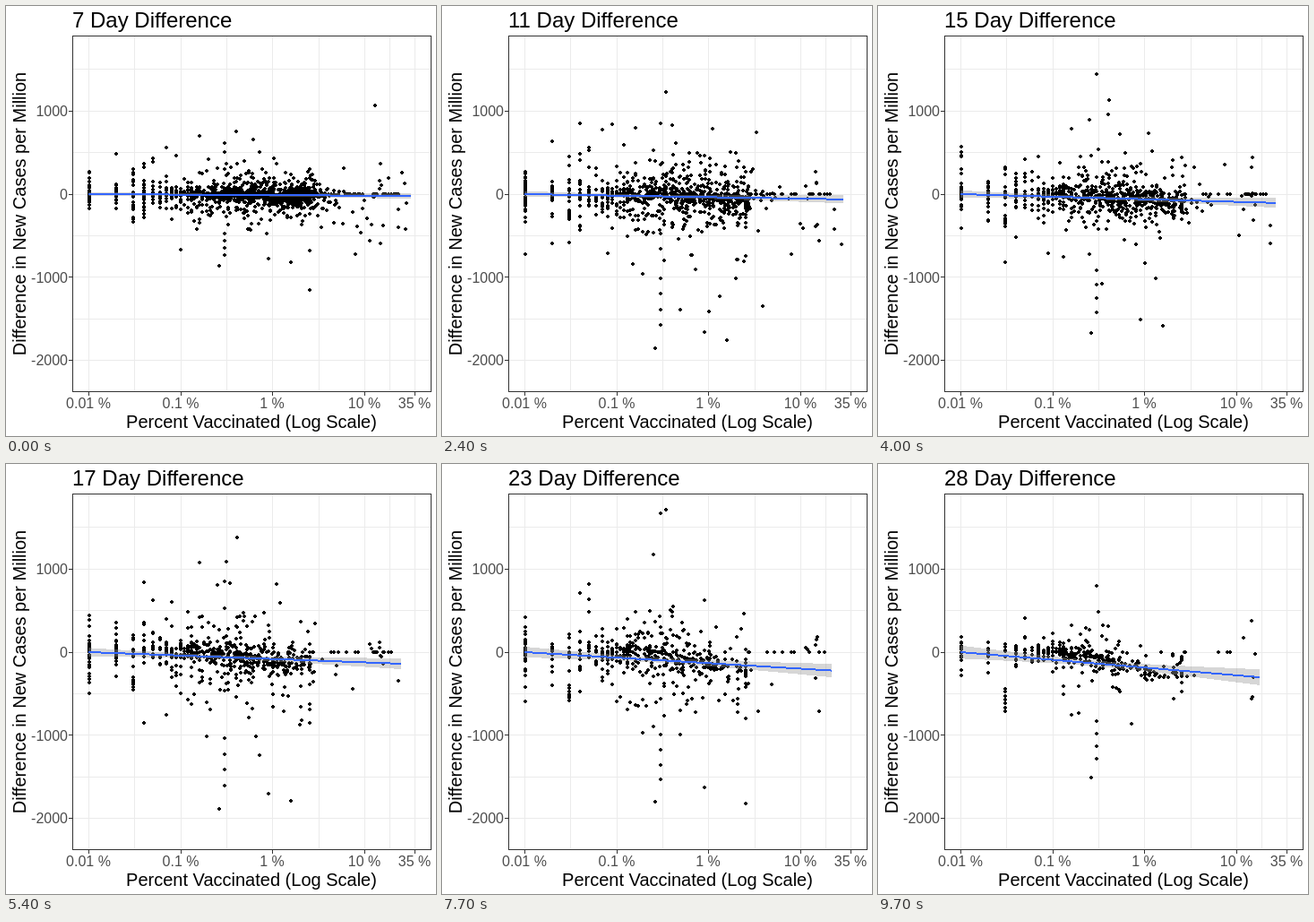
Write an HTML page with a canvas that moves like this. It is 480 px wide and 480 px high and loops after 10 s.

```html
<!DOCTYPE html>
<html lang="en">
<head>
<meta charset="utf-8">
<title>Day Difference</title>
<style>
  html, body { margin: 0; width: 100%; height: 100%; overflow: hidden; background: #fff; }
  canvas, svg { position: absolute; left: 0; top: 0; }
  text { font-family: "Liberation Sans", Arial, sans-serif; font-size: 20px; }
  .tick { font-size: 16px; fill: #4d4d4d; }
</style>
</head>
<body>
<canvas width="480" height="480"></canvas>
<svg width="480" height="480">
  <text id="title" x="74" y="24" style="font-size:24px"></text>
  <text x="274" y="471" text-anchor="middle">Percent Vaccinated (Log Scale)</text>
  <text transform="translate(22 232) rotate(-90)" text-anchor="middle">Difference in New Cases per Million</text>
</svg>
<script>
const ctx = document.querySelector('canvas').getContext('2d');
const svg = document.querySelector('svg');
const title = document.getElementById('title');
const PANEL = { x: 74, y: 33, w: 400, h: 397 };
const ZERO = 210, LEFT = 92.55, DECADE = 102.6;

// Axes: percent on a log scale starting at 0.01, cases on a linear scale
const logToX = lx => LEFT + DECADE * lx;
const percentToX = percent => logToX(Math.log10(percent * 100));
const casesToY = cases => ZERO - 0.0927 * cases;
const percents = [0.01, 0.1, 1, 10, 35];
const cases = [1000, 0, -1000, -2000];

const rand = (i, j) => {
  const s = Math.sin(i * 127.1 + j * 311.7) * 43758.5453;
  return s - Math.floor(s);
};
const gauss = (i, j) =>
  Math.sqrt(-2 * Math.log(rand(i, j) + 1e-9)) * Math.cos(2 * Math.PI * rand(i, j + 0.37));
const weekly = day => Math.abs(Math.sin(Math.PI * day / 7));

// Cloud: each point has an age in days and shows only while the lag is shorter
const COUNT = 1200;
const cloud = Array.from({ length: COUNT }, (_, i) => {
  const q = i / COUNT, r = rand(i, 1), high = q > 0.945;
  let age = 7 - (high ? 11 : 17) * Math.log(rand(i, 2) + 1e-9), lx;
  if (q < 0.17) lx = 1.25 * r;
  else if (q < 0.93) {
    lx = 2.18 - 0.022 * (age - 7) + 0.38 * gauss(i, 3);
    if (lx > 2.3) lx = 2.3 + (lx - 2.3) * 0.5;
  } else if (!high) {
    lx = 2.398;
    age += 14;
  } else lx = 3.5 - 0.0107 * (age - 7) - 0.85 * r ** 1.5;
  lx = Math.log10(Math.max(1, Math.floor(10 ** lx + 0.2)));
  return { i, age, lx, high, x: logToX(lx), wild: Math.exp(0.9 * gauss(i, 4)) };
});

const lineEnd = day => Math.min(452 - 1.1 * (day - 7), 426 + 6 * (28 - day));
const lineDrop = day => 2 + 0.58 * (day - 7) ** 1.25;
const lineY = (x, day) => ZERO + lineDrop(day) * (x - 92) / (lineEnd(day) - 92);

function cloudY(p, day) {
  const noise = 0.6 * gauss(p.i, 5) + 0.8 * gauss(p.i, 10 + day);
  if (p.high) return ZERO + (p.i % 2 ? 0 : 18 + noise * (28 + 14 * weekly(day)));
  const scale = 0.75 + 0.25 * Math.min(1, p.lx / 1.5);
  const offset = noise * p.wild * scale * (6 + 8 * weekly(day));
  const pull = Math.min(1.2, Math.max(0, (p.lx - 1.1) * 1.3));
  const drop = (lineY(p.x, day) - ZERO) * pull;
  return ZERO + drop + 190 * Math.tanh((offset > 0 ? 1.2 : 1) * offset / 190);
}

function rect(color, x, y, w, h) {
  ctx.fillStyle = color;
  ctx.fillRect(x, y, w, h);
}

function dot(x, y) {
  x = Math.round(x);
  y = Math.round(y);
  rect('#000', x - 2, y - 1, 4, 2);
  rect('#000', x - 1, y - 2, 2, 4);
}

function drawGrid() {
  const { x, y, w, h } = PANEL, grid = '#ebebeb', dark = '#333';
  const column = px => rect(grid, Math.floor(px), y, 1, h);
  const row = py => rect(grid, x, Math.floor(py), w, 1);
  rect('#fff', 0, 0, 480, 480);
  percents.forEach((percent, i) => {
    const px = percentToX(percent);
    column(px);
    if (i) column((px + percentToX(percents[i - 1])) / 2);
    rect(dark, Math.floor(px), y + h + 1, 1, 4);
  });
  for (const value of cases) {
    row(casesToY(value));
    row(casesToY(value + 500));
    rect(dark, x - 4, Math.floor(casesToY(value)), 4, 1);
  }
}

// Places that stay far below the rest through most of the loop
function drawLowPoints(day) {
  const depth = 80 + 60 * Math.min(1, (day - 7) / 4) + 35 * weekly(day);
  const low = (percent, share) => dot(percentToX(percent), ZERO + depth * share);
  low(0.26, 1);
  if (day < 24) low(0.9, 0.9);
  if (day < 19) low(1.58, 0.95);
  for (let share = 0.55; share < 0.9; share += 0.1) low(0.3, share);
  for (let j = 0; j < 6; j++) {
    dot(percentToX(0.03), ZERO + (15 + 2 * (day - 7)) * (0.78 + 0.075 * j));
  }
}

function drawPoints(day) {
  const from = Math.floor(day), to = Math.ceil(day);
  for (const p of cloud) {
    if (p.age >= to) dot(p.x, (cloudY(p, from) + cloudY(p, to)) / 2);
  }
  drawLowPoints(day);
}

function drawFit(day) {
  const end = lineEnd(day), middle = 240;
  for (let x = 92; x < end; x++) {
    const y = lineY(x, day);
    const half = (3 + 0.25 * (day - 7)) * Math.sqrt(0.15 + ((x - middle) / (end - middle)) ** 2);
    const top = Math.round(y - half);
    rect('rgba(153,153,153,0.4)', x, top, 1, Math.round(y + half) - top);
    rect('#36f', x, Math.round(y) - 1, 1, 2);
  }
}

// Each day holds, then shows the midpoint to the next day for 100 ms
function dayAt(t) {
  const late = t >= 6500, period = late ? 400 : 500, local = late ? t - 6500 : t;
  const step = Math.floor(local / period) + (late ? 13 : 0);
  return 7 + step + (local % period >= period - 100 ? 0.5 : 0);
}

function addLabel(text, x, y, anchor) {
  const el = document.createElementNS('http://www.w3.org/2000/svg', 'text');
  el.setAttribute('class', 'tick');
  el.setAttribute('x', x);
  el.setAttribute('y', y);
  el.setAttribute('text-anchor', anchor);
  el.textContent = text;
  svg.append(el);
}
for (const percent of percents) addLabel(`${percent} %`, Math.floor(percentToX(percent)), 449, 'middle');
for (const value of cases) addLabel(value, 69, Math.round(casesToY(value)) + 6, 'end');

let shown;
function tick() {
  const day = dayAt(performance.now() % 10000);
  if (day !== shown) {
    shown = day;
    title.textContent = `${Math.floor(day)} Day Difference`;
    drawGrid();
    drawPoints(day);
    drawFit(day);
    ctx.strokeStyle = '#333';
    ctx.strokeRect(PANEL.x + 0.5, PANEL.y + 0.5, PANEL.w, PANEL.h);
  }
  requestAnimationFrame(tick);
}
tick();
</script>
</body>
</html>
```
